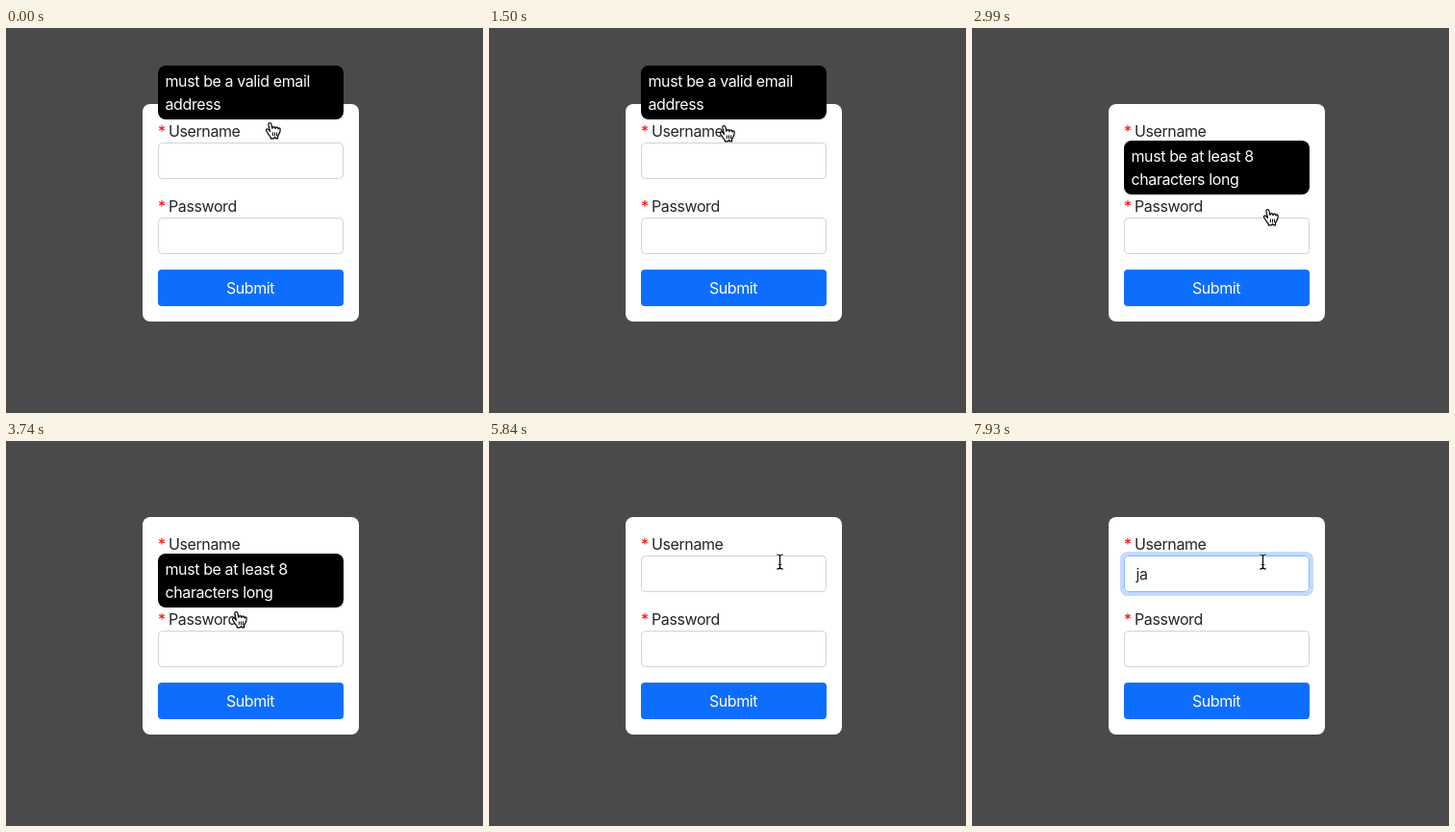
Write an HTML page with a canvas that moves like this. It is 496 px wide and 400 px high and loops after 8000 ms.

```html
<!DOCTYPE html>
<html lang="en">
<head>
<meta charset="utf-8">
<title>Form validation tooltips</title>
<style>
  html, body { margin: 0; width: 100%; height: 100%; overflow: hidden; background: #4a4a4a; }
  canvas { display: block; width: 496px; height: 400px; }
</style>
</head>
<body>
<canvas id="stage"></canvas>
<script>
const W = 496, H = 400, LOOP = 8000, STEP = 150;
const canvas = document.getElementById('stage');
const ctx = canvas.getContext('2d');
const dpr = window.devicePixelRatio || 1;
canvas.width = W * dpr;
canvas.height = H * dpr;
ctx.scale(dpr, dpr);

const FONT = 'Inter, Roboto, sans-serif';
const INK = '#212529';

// Pointer runs: start time, shape, then one x,y pair per STEP.
const runs = [
  [0, 'hand', 270, 98, 268, 98, 262, 97, 254, 97, 246, 99, 239, 101, 236, 102, 238, 101, 239, 101],
  [1500, 'hand', 240, 101, 246, 101, 262, 99, 292, 97, 328, 96],
  [2250, 'arrow', 366, 91, 390, 87],
  [2540, 'arrow', 421, 136],
  [2690, 'arrow', 411, 172, 366, 191],
  [2990, 'hand', 303, 188, 252, 180, 233, 177],
  [3740, 'hand', 235, 177],
  [4790, 'hand', 247, 175],
  [4940, 'arrow', 322, 162, 412, 146, 461, 137, 436, 127, 368, 118],
  [5690, 'beam', 300, 115, 298, 117]
];

const handShape = new Path2D(
  'M3.4 13.2L.8 9Q0 7.3 1.5 6.8Q2.8 6.8 4.5 9.3L2.9 2.4Q2.7.6 4.2.5Q5.6.5 6 2.4' +
  'L6.9 6.4Q7.1 4.9 8.3 4.7Q9.8 4.7 10 6.6Q10.2 5 11.3 4.9Q12.8 4.9 13 7' +
  'Q13.4 5.6 14.4 5.8Q15.3 6 15.2 7.8Q15 11 13.6 12.6L12.5 14.6L12.6 16.8H10.6' +
  'L9.6 15.3L8.4 16.8H5.3L5.2 15.3Z');
const handLines = new Path2D('M7.4 10.4V14M9.5 10.4V14M11.6 10.4V14');
const arrowShape = new Path2D('M.7.8V15.6L4 12.5L6.2 17.4L8.4 16.5L6.3 11.6H11Z');
const beamShape = new Path2D(
  'M1.2 1Q4.5 1 4.5 3Q4.5 1 7.8 1M4.5 2.5V14.5M1.2 16Q4.5 16 4.5 14Q4.5 16 7.8 16M2.8 11.5H6.2');

function box(x, y, w, h, r, fill, line) {
  ctx.beginPath();
  ctx.roundRect(x, y, w, h, r);
  ctx.fillStyle = fill;
  ctx.fill();
  if (line) {
    ctx.beginPath();
    ctx.roundRect(x + .5, y + .5, w - 1, h - 1, r);
    ctx.strokeStyle = line;
    ctx.lineWidth = 1;
    ctx.stroke();
  }
}

function text(str, x, y, color, align = 'left', font = '400 16px ', spacing = '-0.4px') {
  ctx.font = font + FONT;
  ctx.letterSpacing = spacing;
  ctx.textAlign = align;
  ctx.fillStyle = color;
  ctx.fillText(str, x, y);
}

function field(label, y, focused) {
  text('*', 158, y, '#f00');
  text(label, 169, y, INK);
  if (focused) box(154, y + 2, 201, 46, 8, '#c2dbfe');
  box(158, y + 6, 193, 38, 4, '#fff', focused ? '#86b7fe' : '#ced4da');
}

function tooltip(y, first, second) {
  box(158, y, 193, 56, 8, '#000');
  text(first, 165.5, y + 22, '#fff');
  text(second, 165.5, y + 46, '#fff');
}

function suggestions() {
  ctx.save();
  ctx.shadowColor = 'rgba(0,0,0,.4)';
  ctx.shadowBlur = 3;
  ctx.shadowOffsetY = 1;
  box(157, 158, 194, 88, [0, 0, 4, 4], '#292a2d');
  ctx.restore();
  text('clerk@ui.test', 169, 189, '#e8eaed', 'left', '500 13px ', '0px');
  text('neb@example.com', 169, 225, '#e8eaed', 'left', '500 13px ', '0px');
}

function stroke(path, color, width) {
  ctx.strokeStyle = color;
  ctx.lineWidth = width;
  ctx.stroke(path);
}

function pointer(t) {
  const [start, kind, ...pts] = runs.filter(r => r[0] <= t).pop();
  const i = Math.min(Math.floor((t - start) / STEP), pts.length / 2 - 1);
  ctx.save();
  ctx.translate(pts[2 * i], pts[2 * i + 1]);
  ctx.lineJoin = 'round';
  if (kind === 'hand') {
    ctx.fillStyle = '#fff';
    ctx.fill(handShape);
    stroke(handShape, '#000', 1.2);
    stroke(handLines, '#000', 1);
  } else if (kind === 'arrow') {
    stroke(arrowShape, '#fff', 2);
    ctx.fillStyle = '#000';
    ctx.fill(arrowShape);
  } else {
    stroke(beamShape, '#fff', 2.6);
    stroke(beamShape, '#000', 1.2);
  }
  ctx.restore();
}

function draw(t) {
  const within = (a, b) => t >= a && t < b;
  const focused = t >= 5990;
  ctx.fillStyle = '#4a4a4a';
  ctx.fillRect(0, 0, W, H);
  box(142, 79, 225, 226, 8, '#fff');
  field('Username', 113, focused);
  field('Password', 191, false);
  box(158, 251, 193, 38, 4, '#0d6efd');
  text('Submit', 254, 276, '#fff', 'center');

  if (focused) {
    const typed = t < 7180 ? '' : t < 7480 ? 'j' : 'ja';
    text(typed, 170.5, 144, INK);
    if (!within(6430, 6880) && t < 7930) {
      ctx.fillStyle = '#000';
      ctx.fillRect([171, 174, 183][typed.length], 129, 1, 18);
    }
  }
  if (within(6130, 7180)) suggestions();
  if (t < 2100) tooltip(39, 'must be a valid email', 'address');
  if (within(2990, 5090)) tooltip(117, 'must be at least 8', 'characters long');
  pointer(t);
}

const begin = performance.now();
function tick() {
  draw((performance.now() - begin) % LOOP);
  requestAnimationFrame(tick);
}
tick();
</script>
</body>
</html>
```
